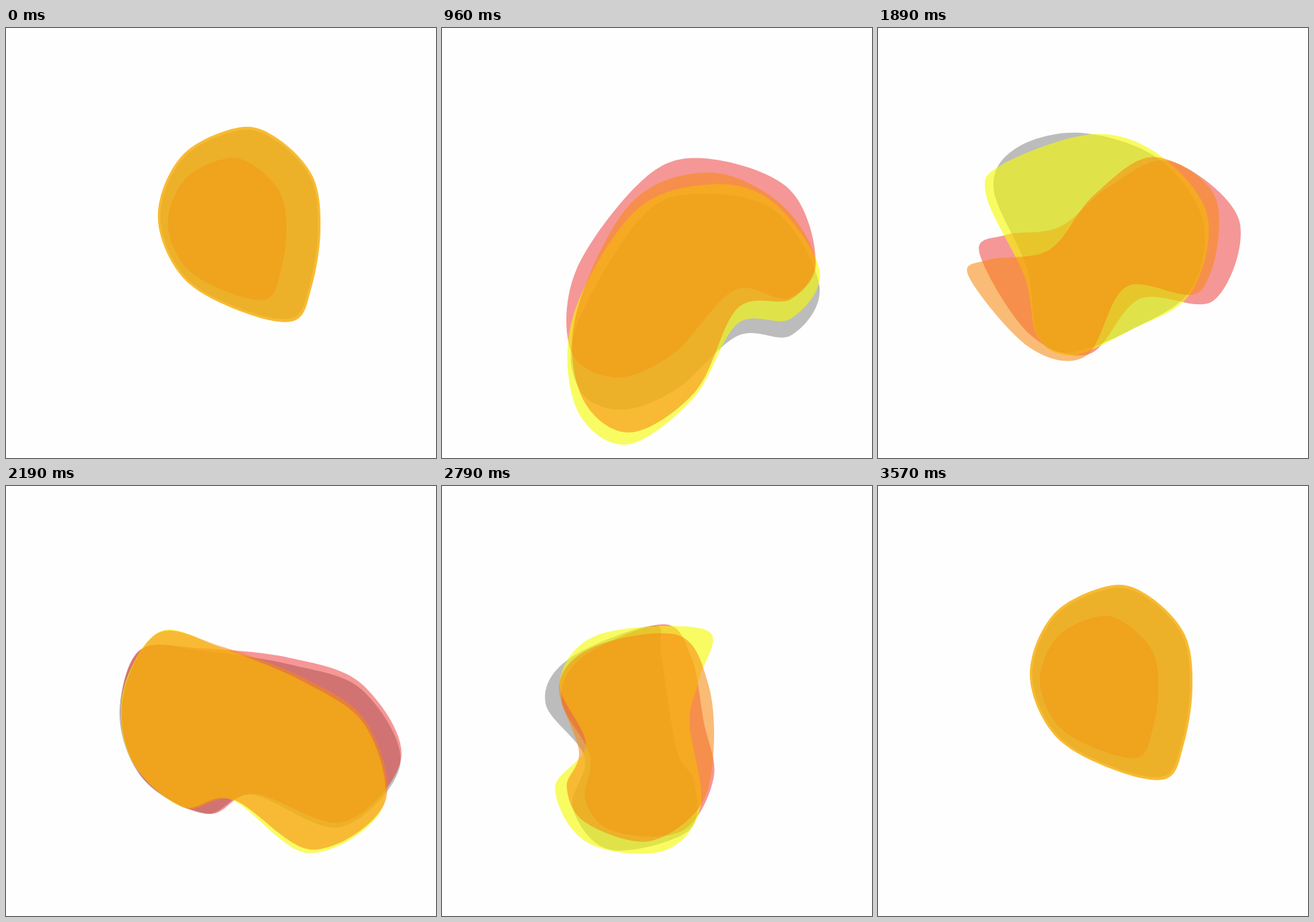
An HTML page for the animation above (3.6 s loop, 640 by 640 pixels).

```html
<!DOCTYPE html>
<html lang="en">
<head>
<meta charset="utf-8">
<title>Morphing blobs</title>
<style>
  html, body { margin: 0; width: 100%; height: 100%; overflow: hidden; background: #fefefe; }
  svg { display: block; width: 100%; height: 100%; }
</style>
</head>
<body>
<svg viewBox="0 0 640 640"></svg>
<script>
const LOOP = 3600;
const TIMES = [0, 960, 1440, 1890, 2175, 2520, 3090, 3570];
const CENTER = [320, 340];

// Every pose lists ten outline points, clockwise from the tail.
const REST = [428,436, 345,420, 262,370, 226,280, 262,190, 347,148, 405,165, 457,222, 468,300, 455,385];
const SWING = [205,236, 300,240, 430,262, 533,310, 582,425, 487,513, 359,459, 286,486, 200,430, 170,332];

const layers = [
  { fill: '#bcbcbc', scale: .97, pivot: [348, 293], turn: -4, poses: [
    [267,568, 205,538, 200,445, 300,278, 395,247, 500,275, 562,385, 520,457, 440,458, 350,537],
    [58,362, 48,293, 120,235, 220,217, 345,243, 437,355, 425,485, 335,545, 280,500, 255,443],
    [172,240, 205,179, 300,156, 415,193, 483,285, 465,390, 375,450, 285,483, 238,458, 222,358],
    [270,245, 298,300, 310,382, 430,433, 485,518, 385,614, 292,560, 292,472, 185,440, 182,345],
    [410,203, 432,265, 408,355, 318,438, 265,448, 195,400, 179,340, 218,270, 250,195, 305,170]] },
  { fill: 'rgba(233,26,26,.45)', scale: .728, pivot: [281, 317], turn: -6, poses: [
    [260,520, 192,480, 200,360, 300,225, 390,194, 515,238, 556,345, 515,402, 435,390, 345,484],
    [115,338, 115,255, 195,193, 295,178, 425,210, 496,340, 460,463, 385,517, 330,480, 285,417],
    [190,308, 270,296, 345,235, 435,198, 537,285, 500,405, 390,403, 315,485, 225,455, 151,335],
    [287,213, 335,262, 370,345, 470,410, 490,520, 385,582, 312,540, 297,458, 200,415, 190,325],
    [390,223, 423,285, 412,382, 330,432, 262,432, 212,385, 198,340, 220,275, 257,212, 310,196]] },
  { fill: 'rgba(245,252,1,.61)', scale: 1, pivot: CENTER, turn: 10, poses: [
    [275,620, 200,565, 195,430, 285,275, 395,233, 490,257, 562,360, 520,432, 440,440, 375,550],
    [41,360, 95,275, 190,227, 285,216, 375,243, 441,380, 405,505, 340,531, 272,463, 130,450],
    [161,250, 185,203, 320,158, 420,190, 490,280, 465,395, 375,450, 290,487, 238,460, 218,370],
    [345,235, 353,300, 362,380, 453,510, 410,598, 300,614, 244,530, 273,465, 190,388, 225,295],
    [467,222, 430,292, 375,332, 325,425, 262,459, 180,405, 162,317, 238,270, 268,180, 345,149]] },
  { fill: 'rgba(248,137,18,.57)', scale: 1, pivot: CENTER, turn: 8, poses: [
    [280,602, 208,548, 200,425, 280,262, 395,215, 500,258, 556,345, 520,403, 440,417, 378,540],
    [62,365, 105,268, 200,217, 305,201, 405,240, 459,370, 420,490, 365,510, 295,449, 150,450],
    [165,345, 255,330, 320,250, 410,192, 503,255, 480,391, 370,385, 310,488, 225,475, 135,370],
    [325,249, 358,315, 382,400, 448,505, 400,597, 300,600, 256,530, 272,462, 187,385, 222,303],
    [410,203, 443,275, 425,385, 325,432, 255,430, 200,375, 184,325, 210,262, 255,188, 320,165]] }
];

function toPolar(flat, turn = 0) {
  const points = [];
  for (let i = 0; i < flat.length; i += 2) {
    const x = flat[i] - CENTER[0], y = flat[i + 1] - CENTER[1];
    points.push([Math.hypot(x, y), Math.atan2(y, x) + turn * Math.PI / 180]);
  }
  return points;
}

// Tracks hold each point's radius and continuous angle at every key time.
function buildTracks({ scale, pivot, turn, poses }) {
  const rest = toPolar(REST.map((v, i) => pivot[i % 2] + scale * (v - pivot[i % 2])));
  const keys = poses.map(p => toPolar(p));
  const all = [rest, ...keys.slice(0, 3), toPolar(SWING, turn), ...keys.slice(3), rest];
  return rest.map((_, i) => {
    const radii = all.map(pose => pose[i][0]);
    const angles = [rest[i][1]];
    for (let k = 1; k < all.length; k++) {
      const step = all[k][i][1] - angles[k - 1];
      angles.push(angles[k - 1] + Math.atan2(Math.sin(step), Math.cos(step)));
    }
    return { radii, angles };
  });
}

function slope(values, k) {
  if (k === 0 || k === TIMES.length - 1) return 0;
  return (values[k + 1] - values[k - 1]) / (TIMES[k + 1] - TIMES[k - 1]);
}

function sample(values, k, t) {
  const span = TIMES[k + 1] - TIMES[k], u = (t - TIMES[k]) / span, v = 1 - u;
  return values[k] * (1 + 2 * u) * v * v + values[k + 1] * u * u * (3 - 2 * u)
    + span * u * v * (slope(values, k) * v - slope(values, k + 1) * u);
}

function smoothPath(points) {
  const n = points.length, at = i => points[(i + n) % n];
  const control = (i, sign) => at(i).map((v, a) => v + sign * (at(i + 1)[a] - at(i - 1)[a]) / 6);
  let d = 'M' + points[0];
  for (let i = 0; i < n; i++) d += `C${control(i, 1)} ${control(i + 1, -1)} ${at(i + 1)}`;
  return d + 'Z';
}

const svg = document.querySelector('svg');
for (const layer of layers) {
  layer.tracks = buildTracks(layer);
  layer.path = document.createElementNS(svg.namespaceURI, 'path');
  layer.path.setAttribute('fill', layer.fill);
  svg.append(layer.path);
}

function draw(now) {
  const t = Math.min(now % LOOP, TIMES.at(-1));
  const k = Math.min(TIMES.findLastIndex(time => time <= t), TIMES.length - 2);
  for (const { tracks, path } of layers) {
    const points = tracks.map(({ radii, angles }) => {
      const r = sample(radii, k, t), a = sample(angles, k, t);
      return [CENTER[0] + r * Math.cos(a), CENTER[1] + r * Math.sin(a)];
    });
    path.setAttribute('d', smoothPath(points));
  }
}

const start = performance.now();
function tick() {
  draw(performance.now() - start);
  requestAnimationFrame(tick);
}
tick();
</script>
</body>
</html>
```
